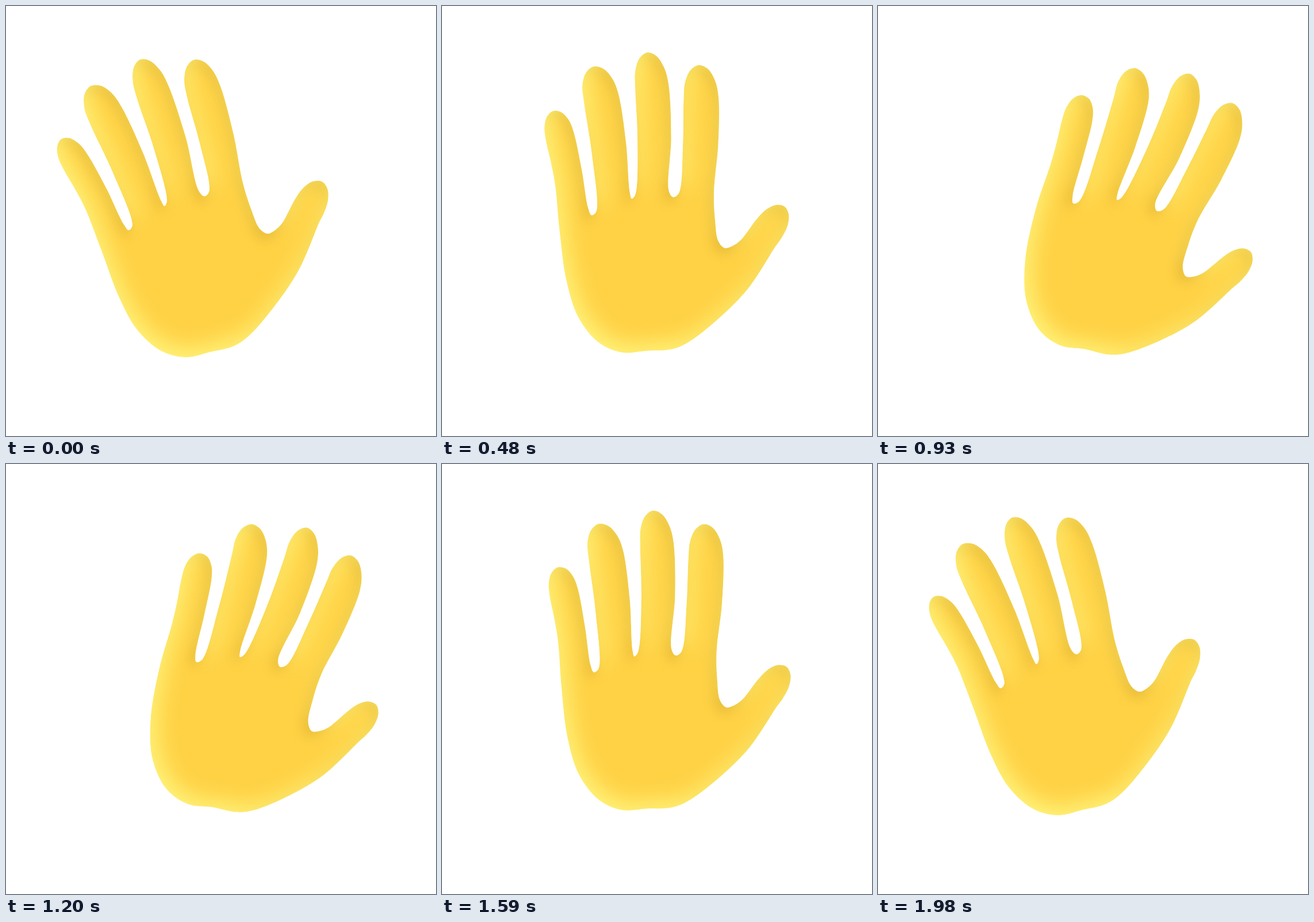
Animation, 748 px wide and 748 px high, one loop 2010 ms. Source, as an HTML page:

```html
<!DOCTYPE html>
<html lang="en">
<head>
<meta charset="utf-8">
<title>Waving hand</title>
<style>
  html, body { margin: 0; width: 100%; height: 100%; overflow: hidden; background: #fff; }
  svg { display: block; width: 100%; height: 100%; }
</style>
</head>
<body>
<svg viewBox="0 0 748 748">
  <filter id="shade" filterUnits="userSpaceOnUse" x="-60" y="-60" width="868" height="868" color-interpolation-filters="sRGB">
    <feFlood flood-color="#be8c14" flood-opacity=".37"/>
    <feComposite in2="SourceAlpha" operator="out"/>
    <feOffset id="dark"/>
    <feGaussianBlur stdDeviation="10" result="shadow"/>
    <feFlood flood-color="#fff47c"/>
    <feComposite in2="SourceAlpha" operator="out"/>
    <feOffset id="light"/>
    <feGaussianBlur stdDeviation="19" result="glow"/>
    <feMerge result="all">
      <feMergeNode in="SourceGraphic"/>
      <feMergeNode in="shadow"/>
      <feMergeNode in="glow"/>
    </feMerge>
    <feComposite in="all" in2="SourceAlpha" operator="in"/>
  </filter>
  <path id="hand" fill="#ffd245" filter="url(#shade)"/>
</svg>
<script>
const LOOP = 2010, STEP = 30, SWING = 990, LEAD = 8;
const PIVOT = { x: 369, y: 612 };
const SWEEP = 1.091;      // how far the swing goes, in units of the bend rule below
const CURVE = 0.00045;    // sideways bow of a finger along its length
const RAD = Math.PI / 180;

// A digit is a half ellipse on two bowed sides; left and right are the side lengths
const FINGERS = [
  { x: 120, y: 269.5, lean: -31, half: 24.5, tip: 45, left: 79, right: 138 },
  { x: 172.5, y: 188, lean: -27.5, half: 31, tip: 55, left: 194, right: 178 },
  { x: 255, y: 149, lean: -21, half: 29.5, tip: 60, left: 187, right: 190 },
  { x: 344, y: 149, lean: -17.5, half: 30.5, tip: 58, left: 168, right: 172 }
];
const THUMB = { x: 527, y: 350, lean: 27, half: 28, tip: 50, left: 45, right: 16 };
const WEB = [[427, 355], [441, 387], [455, 396], [468, 390]];
const PALM = [
  [510, 458], [465, 525], [420, 576], [395, 592], [355, 602],
  [313, 611], [270, 600], [228, 563], [196, 505], [166, 425]
];

const clamp = v => Math.min(1, Math.max(0, v));
const smooth = (v, a, b) => {
  const s = clamp((v - a) / (b - a));
  return s * s * (3 - 2 * s);
};

function digit({ x, y, lean, half, tip, left, right }) {
  const c = Math.cos(lean * RAD), s = Math.sin(lean * RAD);
  const at = (side, up) => [x + side * c + up * s, y + side * s - up * c];
  const edge = (side, down) => at(side - CURVE * down * down, -down);
  const arc = Array.from({ length: 7 }, (_, i) => {
    const a = Math.PI * (1 - i / 6);
    return at(half * Math.cos(a), tip * Math.sin(a));
  });
  return [edge(-half, left), edge(-half, left / 2), ...arc, edge(half, right / 2), edge(half, right)];
}

function outline() {
  const pts = [];
  for (const finger of FINGERS) {
    const next = digit(finger);
    if (pts.length) {
      const a = pts[pts.length - 1], b = next[0];
      pts.push([(a[0] + b[0]) / 2 + 1, (a[1] + b[1]) / 2 + 9]);
    }
    pts.push(...next);
  }
  return [...pts, ...WEB, ...digit(THUMB), ...PALM];
}

// Turn a point about the wrist: fingertips lead, the heel trails, the thumb tucks in
function bend([x, y], k) {
  const dx = x - PIVOT.x, dy = PIVOT.y - y;
  const r = Math.hypot(dx, dy), a = Math.atan2(dx, dy) / RAD;
  const reach = smooth(r, 200, 480);
  const thumb = smooth(a, 8, 22);
  const heel = clamp((-a - 34) / 45);
  const turn = 26 + reach * (5.5 - 8.5 * thumb) - 6 * heel;
  const shrink = 0.022 * reach * (1 - thumb) + 0.055 * thumb * smooth(r, 120, 230);
  const angle = (a + k * turn) * RAD, radius = r * (1 - k * shrink);
  return [PIVOT.x + radius * Math.sin(angle), PIVOT.y - radius * Math.cos(angle)];
}

// cubic-bezier(.45, 0, .7, 1)
function ease(x) {
  let lo = 0, hi = 1;
  for (let i = 0; i < 24; i++) {
    const s = (lo + hi) / 2, r = 1 - s;
    if (3 * s * r * (r * .45 + s * .7) + s ** 3 < x) lo = s; else hi = s;
  }
  return smooth(lo, 0, 1);
}

// Closed centripetal spline written as cubic curves
function spline(pts) {
  const n = pts.length;
  const gap = (p, q) => Math.sqrt(Math.hypot(q[0] - p[0], q[1] - p[1]));
  const knots = pts.map((p, i) => {
    const o = pts[(i + n - 1) % n], q = pts[(i + 1) % n];
    const a = gap(o, p), b = gap(p, q);
    const m = [0, 1].map(k => (p[k] - o[k]) / a - (q[k] - o[k]) / (a + b) + (q[k] - p[k]) / b);
    const handle = d => m.map((v, k) => (p[k] + v * d / 3).toFixed(2));
    return { p: handle(0), before: handle(-a), after: handle(b) };
  });
  return 'M' + knots[0].p + knots.map((k, i) => {
    const next = knots[(i + 1) % n];
    return `C${k.after} ${next.before} ${next.p}`;
  }).join('') + 'Z';
}

const el = id => document.getElementById(id);
const hand = el('hand'), light = el('light'), dark = el('dark');
const rest = outline();

function shift(node, x, y, angle) {
  const c = Math.cos(angle), s = Math.sin(angle);
  node.setAttribute('dx', (x * c - y * s).toFixed(2));
  node.setAttribute('dy', (x * s + y * c).toFixed(2));
}

function draw(t) {
  const phase = t < SWING ? ease(t / SWING) : 1 - ease(clamp(t / SWING - 1));
  const k = phase * SWEEP, angle = k * 27 * RAD;
  hand.setAttribute('d', spline(rest.map(p => bend(p, k))));
  shift(light, 6, -14, angle);
  shift(dark, -5, 11, angle);
}

const start = performance.now();
let last = -1;
function tick() {
  const t = Math.floor((performance.now() - start + LEAD) % LOOP / STEP) * STEP;
  if (t !== last) draw(last = t);
  requestAnimationFrame(tick);
}
tick();
</script>
</body>
</html>
```
